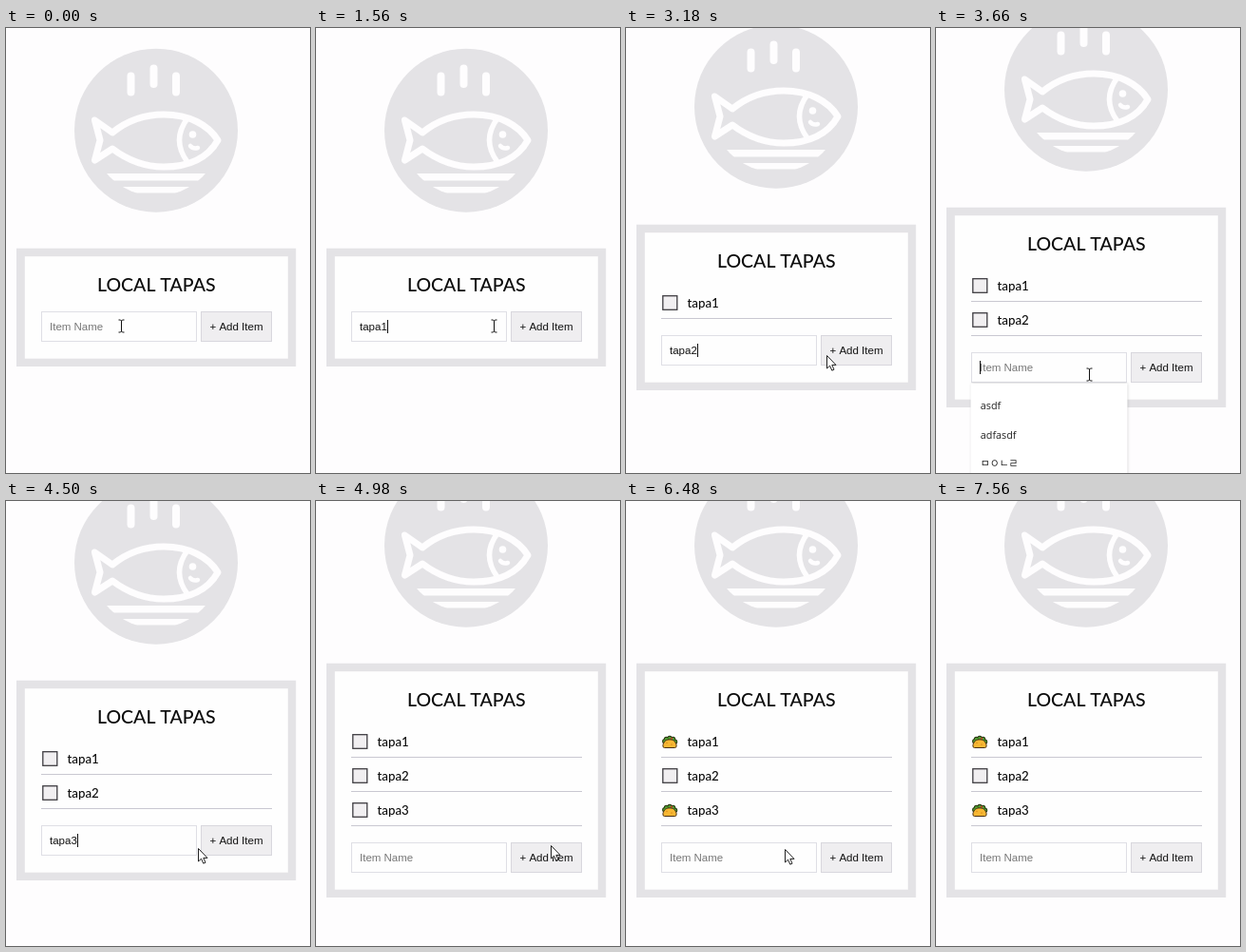
An HTML page with a canvas for the animation above (7.86 s loop, 320 by 468 pixels).

```html
<!DOCTYPE html>
<html lang="en">
<head>
<meta charset="utf-8">
<title>Local Tapas</title>
<style>
html, body { margin: 0; width: 100%; height: 100%; overflow: hidden; background: #fefdfe; }
canvas { display: block; width: 320px; height: 468px; }
</style>
</head>
<body>
<canvas id="stage"></canvas>
<script>
const W = 320, H = 468, LOOP = 7860, STEP = 60;
const canvas = document.getElementById('stage');
const ctx = canvas.getContext('2d');
const dpr = window.devicePixelRatio || 1;
canvas.width = W * dpr;
canvas.height = H * dpr;

const GREY = '#e4e3e6', PAGE = '#fefdfe';
const TREB = '"Trebuchet MS", Lato, "Open Sans", sans-serif';
const ARIAL = '11.5px "Liberation Sans", Arial, sans-serif';
const MENU = '10.8px "Open Sans", "Noto Sans CJK KR", "Noto Sans CJK", sans-serif';

const adds = [1860, 3360, 4860];
const checks = { 0: 5460, 2: 5820 };
const typing = [
  [0, ''], [420, 't'], [840, 'ta'], [960, 'tap'], [1020, 'tapa'], [1320, 'tapa1'],
  [1860, ''], [2460, 't'], [2520, 'ta'], [2640, 'tap'], [2760, 'tapa'], [2820, 'tapa2'],
  [3360, ''], [3780, 't'], [3840, 'ta'], [4020, 'tap'], [4080, 'tapa'], [4380, 'tapa3'],
  [4860, '']
];
const focus = [[60, 1860], [2160, 3360], [3600, 4860]];
const menus = [[60, 420], [2160, 2460], [3600, 4080]];
const path = [
  [0, 122, 313], [1320, 122, 313], [1560, 188, 313], [1740, 236, 316], [1860, 236, 316],
  [2100, 121, 331], [3000, 121, 331], [3240, 228, 346], [3360, 228, 346], [3600, 162, 364],
  [4320, 162, 364], [4680, 241, 366], [4860, 241, 366], [4980, 247, 362], [5400, 46, 253],
  [5520, 46, 253], [5760, 46, 326], [5880, 46, 326], [6240, 167, 366], [6540, 167, 366],
  [6660, 167, 361], [6960, 167, 361], [7560, 192, 478]
];

const clamp = v => Math.max(0, Math.min(1, v));
const within = (t, [a, b]) => t >= a && t < b;

function valueAt(list, t) {
  return list.filter(e => e[0] <= t).pop()[1];
}

function pointer(t) {
  const i = path.findIndex(p => p[0] > t);
  if (i < 0) return null;
  const [t0, x0, y0] = path[i - 1], [t1, x1, y1] = path[i];
  const k = (t - t0) / (t1 - t0), e = k * k * (3 - 2 * k);
  return { x: x0 + (x1 - x0) * e, y: y0 + (y1 - y0) * e };
}

function text(str, x, y, font, color, align = 'left') {
  ctx.font = font;
  ctx.fillStyle = color;
  ctx.textAlign = align;
  ctx.fillText(str, x, y);
}

function rect(x, y, w, h, fill, stroke, line = 1) {
  ctx.fillStyle = fill;
  ctx.fillRect(x, y, w, h);
  if (!stroke) return;
  ctx.strokeStyle = stroke;
  ctx.lineWidth = line;
  ctx.strokeRect(x, y, w, h);
}

function stroke(d, width, color = PAGE) {
  ctx.strokeStyle = color;
  ctx.lineWidth = width;
  ctx.stroke(new Path2D(d));
}

function shape(d, fill, line) {
  ctx.fillStyle = fill;
  ctx.fill(new Path2D(d));
  stroke(d, 1, line);
}

function dot(x, y, r, color) {
  ctx.fillStyle = color;
  ctx.beginPath();
  ctx.arc(x, y, r, 0, 7);
  ctx.fill();
}

function drawBadge(shift) {
  ctx.save();
  ctx.translate(0, -shift);
  ctx.lineCap = ctx.lineJoin = 'round';
  dot(158, 107.7, 86, GREY);
  stroke('M131.5 50.5V67.5M155.5 42.5V59M179 50.5V67.5', 8);
  stroke('M93.5 97L112 110C128 97 147 91 166 91C193 91 213 102 223 118' +
    'C213 136 193 146 166 146C147 146 128 139 112 127L93.5 139L99 118Z', 7);
  stroke('M191 95Q174 118 191 141', 5.5);
  dot(196.5, 112, 3.8, PAGE);
  stroke('M194 124Q197 127.5 202 126', 4.5);
  // The two bars end on an inner circle.
  ctx.beginPath();
  ctx.arc(158, 107.7, 69, 0, 7);
  ctx.clip();
  rect(80, 153, 156, 7.5, PAGE);
  rect(80, 167, 156, 6.5, PAGE);
  ctx.restore();
}

function drawTaco(x, y) {
  ctx.save();
  ctx.translate(x, y);
  ctx.lineJoin = 'round';
  const bumps = [[-5.2, -0.5], [-3.5, -2.8], [0, -3.8], [3.5, -2.8], [5.5, 0]];
  bumps.forEach(([bx, by]) => dot(bx, by, 2.7, '#26330f'));
  bumps.forEach(([bx, by]) => dot(bx, by, 1.8, '#4f9a2f'));
  dot(2, -3.6, 1, '#d8402c');
  shape('M-5.5 6.2Q-7.5 6.2 -7.1 3.4C-6 -1 -3.5 -2.4 0 -2.4C3.5 -2.4 6 -1 7.1 3.4Q7.5 6.2 5.5 6.2Z',
    '#f7b733', '#4a3115');
  dot(-3, 1.2, 0.8, '#e08f1c');
  dot(2, 2.8, 0.8, '#e08f1c');
  ctx.restore();
}

function drawRow(i, y, checked) {
  if (checked) drawTaco(46, y + 0.3);
  else rect(38.8, y - 7.3, 15, 14.6, '#f1eff1', '#3f3d42', 1.3);
  text('tapa' + (i + 1), 64.5, y + 4.7, '500 13.3px ' + TREB, '#0c0c0c');
  rect(37, y + 16, 243, 1, '#c9c8d1');
}

function drawMenu(y, t) {
  const span = menus.find(([a, b]) => t >= a && t < b + 120);
  if (!span) return;
  const single = t >= 3780;
  const items = single ? ['tapa1'] : ['asdf', 'adfasdf', 'ㅁㅇㄴㄹ', 'df'];
  ctx.save();
  ctx.globalAlpha = clamp((t - span[0] + 60) / 120) * clamp(1 - (t - span[1] + 60) / 180);
  ctx.shadowColor = 'rgba(0,0,0,.22)';
  ctx.shadowBlur = 3 * dpr;
  rect(36.5, y, 165, single ? 47 : 150, '#fff');
  ctx.shadowColor = 'transparent';
  items.forEach((s, i) => text(s, 46.8, y + 27 + 30.7 * i, MENU, '#222'));
  ctx.restore();
}

function drawPointer({ x, y }, beam) {
  ctx.save();
  ctx.translate(Math.round(x), Math.round(y));
  if (beam) {
    ctx.translate(-0.5, 0.5);
    stroke('M-3 -6.5H-1L0 -5.5L1 -6.5H3M0 -5.5V5.5M-3 6.5H-1L0 5.5L1 6.5H3', 1, '#111');
  } else {
    shape('M.5 .5V14L3.6 11.2L5.8 16.2L8 15.2L5.8 10.4H10Z', '#fff', '#222');
  }
  ctx.restore();
}

function draw(t) {
  const count = adds.filter(a => t >= a).length;
  const extra = count ? 14 + 36 * count : 0;
  const top = 232 - extra / 2;
  const field = top + 66.5 + extra;

  ctx.setTransform(dpr, 0, 0, dpr, 0, 0);
  rect(0, 0, W, H, PAGE);
  drawBadge(extra / 2);

  rect(11, top - 0.3, 294.2, 124.3 + extra, GREY);
  rect(19.8, top + 8.2, 277, 107.5 + extra, '#fefefe');
  text('LOCAL TAPAS', 158.3, top + 44.6, '500 19.5px ' + TREB, '#0c0c0c', 'center');
  for (let i = 0; i < count; i++) drawRow(i, top + 82 + 36 * i, t >= checks[i]);

  const value = valueAt(typing, t);
  rect(37.5, field, 163, 31, '#fefefe', '#dfdfe5');
  rect(205.5, field, 74, 31, '#efeef0', '#d8d7dd');
  text(value || 'Item Name', 46, field + 19.5, ARIAL, value ? '#111' : '#777');
  if (focus.some(f => within(t, f))) {
    const x = 46 + Math.round(value ? ctx.measureText(value).width : 0);
    rect(x, field + 8.5, 1, 14, '#111');
  }
  text('+ Add Item', 242.5, field + 19.5, ARIAL, '#111', 'center');
  drawMenu(field + 32.5, t);

  const p = pointer(t);
  if (!p) return;
  const overField = p.x > 37 && p.x < 201 && p.y > field && p.y < field + 32;
  drawPointer(p, overField && t < 4860);
}

const start = performance.now();
function frame() {
  const t = (performance.now() - start) % LOOP;
  draw(Math.floor(t / STEP) * STEP);
  requestAnimationFrame(frame);
}
frame();
</script>
</body>
</html>
```
